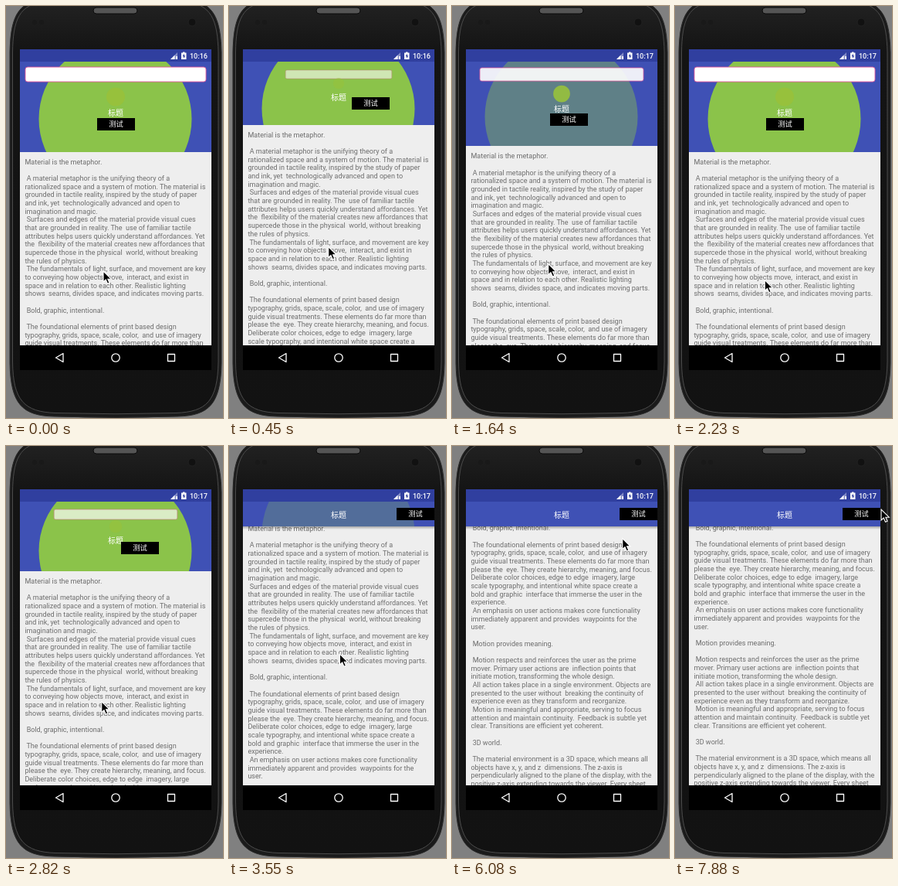
Write an HTML page that moves like this. It is 281 px wide and 533 px high and loops after 8 s.

```html
<!DOCTYPE html>
<html lang="en">
<head>
<meta charset="utf-8">
<title>Collapsing header</title>
<style>
  html, body { margin: 0; width: 100%; height: 100%; overflow: hidden; background: #808080; }
  svg { display: block; width: 281px; height: 533px; }
  text { white-space: pre; font-family: Roboto, "Noto Sans CJK SC", "Noto Sans CJK", sans-serif; }
  .copy { font-size: 9.04px; fill: #6d6d6d; }
  .label { fill: #fff; font-weight: 500; text-anchor: middle; }
</style>
</head>
<body>
<svg viewBox="0 0 281 533">
  <defs>
    <linearGradient id="face" x2="0" y2="1">
      <stop offset="0" stop-color="#222"/><stop offset=".12" stop-color="#141414"/>
      <stop offset="1" stop-color="#121212"/>
    </linearGradient>
    <linearGradient id="shade" x2="0" y2="1">
      <stop offset="0" stop-opacity=".3"/><stop offset="1" stop-opacity="0"/>
    </linearGradient>
    <clipPath id="screen"><rect x="18" y="56" width="248" height="415"/></clipPath>
    <clipPath id="headClip"><rect id="headBox" x="18" y="72" width="248"/></clipPath>
  </defs>

  <!-- Phone -->
  <path d="M5 60C6 20 12 -8 52 -8H230C271 -8 278 20 279 60V462C278 515 263 530 222 531Q142 534 62 531C21 530 6 515 5 462Z" fill="#1b1b1b" stroke="#2a2a2a"/>
  <path d="M8.500 60C9 20 16 -5 54 -5H228C267 -5 274 20 275 60V460C274 511 260 525 220 526.500Q142 529 64 526.500C24 525 9 511 8.500 460Z" fill="url(#face)" stroke="#4c4c4c"/>
  <rect x="113" y="2" width="57" height="8" rx="4" fill="#555" stroke="#0a0a0a"/>
  <circle cx="241" cy="21" r="5" fill="#111" stroke="#222"/>
  <circle cx="37" cy="21" r="3" fill="#191919"/>
  <circle cx="46" cy="21" r="3" fill="#191919"/>

  <g clip-path="url(#screen)">
    <rect x="18" y="56" width="248" height="415" fill="#eee"/>
    <g id="copy" class="copy"></g>

    <g clip-path="url(#headClip)">
      <rect x="18" y="72" width="248" height="120" fill="#3f51b5"/>
      <circle id="hero" cx="141.500" r="99" fill="#8bc34a"/>
      <rect id="scrim" x="18" y="72" width="248" height="120" fill="#3f51b5"/>
    </g>
    <rect id="shadow" x="18" y="104" width="248" height="4" fill="url(#shade)"/>
    <rect id="search" x="-117" y="-9.500" width="234" height="19" rx="3" fill="#fff" stroke="#e0569a" stroke-width=".9"/>
    <circle id="icon" r="12" fill="#97c13c"/>
    <text id="title" class="label" x="142" font-size="10">标题</text>
    <g id="button">
      <rect width="49" height="16"/>
      <text class="label" x="24.500" y="11.400" font-size="9.200">测试</text>
    </g>

    <!-- Status bar -->
    <rect x="18" y="56" width="248" height="16" fill="#303f9f"/>
    <path d="M213 69L222 60V69Z" fill="#fff" fill-opacity=".4"/>
    <path d="M213 69L218.500 63.500V69ZM220 65H222V69H220Z" fill="#fff"/>
    <path d="M227 60.500H229V59.500H231.500V60.500H233.500V69H227Z" fill="#fff"/>
    <path d="M230.800 61.500L228.500 65.200H230V68L232.200 64.300H230.800Z" fill="#303f9f"/>
    <text id="clock" class="label" x="249.500" y="67.500" font-size="9.100"></text>

    <!-- Navigation bar -->
    <rect x="18" y="439" width="248" height="32"/>
    <g fill="none" stroke="#fff" stroke-width="1.300" stroke-linejoin="round">
      <path d="M64.500 455L74 449.500V460.500Z"/>
      <circle cx="142" cy="455" r="5.200"/>
      <rect x="209.500" y="450.500" width="9" height="9"/>
    </g>
  </g>
  <path id="mouse" d="M0 0V14L3.200 11L5.500 16.300L8 15.200L5.800 10.200H10.200Z" stroke="#fff" stroke-width="1.100"/>
</svg>
<script>
const copy = `Material is the metaphor.

 A material metaphor is the unifying theory of a
rationalized space and a system of motion. The material is
grounded in tactile reality, inspired by the study of paper
and ink, yet  technologically advanced and open to
imagination and magic.
 Surfaces and edges of the material provide visual cues
that are grounded in reality. The  use of familiar tactile
attributes helps users quickly understand affordances. Yet
the  flexibility of the material creates new affordances that
supercede those in the physical  world, without breaking
the rules of physics.
 The fundamentals of light, surface, and movement are key
to conveying how objects move,  interact, and exist in
space and in relation to each other. Realistic lighting
shows  seams, divides space, and indicates moving parts.

 Bold, graphic, intentional.

 The foundational elements of print based design
typography, grids, space, scale, color,  and use of imagery
guide visual treatments. These elements do far more than
please the  eye. They create hierarchy, meaning, and focus.
Deliberate color choices, edge to edge  imagery, large
scale typography, and intentional white space create a
bold and graphic  interface that immerse the user in the
experience.
 An emphasis on user actions makes core functionality
immediately apparent and provides  waypoints for the
user.

 Motion provides meaning.

 Motion respects and reinforces the user as the prime
mover. Primary user actions are  inflection points that
initiate motion, transforming the whole design.
 All action takes place in a single environment. Objects are
presented to the user without  breaking the continuity of
experience even as they transform and reorganize.
 Motion is meaningful and appropriate, serving to focus
attention and maintain continuity.  Feedback is subtle yet
clear. Transitions are efficient yet coherent.

 3D world.

 The material environment is a 3D space, which means all
objects have x, y, and z  dimensions. The z-axis is
perpendicularly aligned to the plane of the display, with the
positive z-axis extending towards the viewer. Every sheet`;

const LOOP = 8000, TICK = 148.4, LINE = 10.67;
const $ = id => document.getElementById(id);
const clamp = (v, lo, hi) => Math.max(lo, Math.min(hi, v));
const ease = p => (1 - Math.cos(Math.PI * clamp(p, 0, 1))) / 2;
const set = (id, attrs) => {
  for (const k in attrs) $(id).setAttribute(k, attrs[k]);
};

copy.split("\n").forEach((line, i) => {
  const el = document.createElementNS("http://www.w3.org/2000/svg", "text");
  el.setAttribute("x", 24.4);
  el.setAttribute("y", i * LINE);
  el.textContent = line;
  $("copy").append(el);
});

// Eased moves in ticks: start, end, target value
const drags = [[0, 7, 111.5], [7, 11.9, 201], [15.4, 26, 97.7], [36, 41.2, -87]];
const pointer = [[0, 7, 133, 262], [7, 11.9, 124, 340], [11.9, 15.4, 116, 355], [15.4, 26, 146, 261],
  [27, 32, 239, 88], [33, 35, 146, 286], [36, 41.2, 221, 119], [41.2, 42, 239, 93],
  [47, 50, 154, 196], [51, 53, 267, 82]];

const follow = (moves, from, n) => moves.reduce(
  (pos, [a, b, ...to]) => pos.map((v, i) => v + (to[i] - v) * ease((n - a) / (b - a))), from);

function draw(now) {
  const n = Math.floor(now % LOOP / TICK + 0.08);
  const [y] = follow(drags, [201], n);
  const bottom = Math.round(clamp(y - 12.4, 104, 189));
  const open = (bottom - 104) / 85, shut = 1 - open;
  const fade = start => clamp((n - start) / 4, 0, 1);

  set("copy", { transform: `translate(0 ${y + 3.6})` });
  set("headBox", { height: bottom - 72 });
  set("hero", { cy: 146 - shut * 32 });
  set("scrim", { opacity: fade(3) - fade(9.3) + fade(21) });
  set("shadow", { opacity: open ? 0 : 1 });
  set("search", { transform: `translate(142 88.500) scale(${open})`, opacity: open });
  set("icon", { transform: `translate(142 ${117.5 - shut * 42}) scale(${open})`, opacity: open });
  set("title", { y: 142 - shut * 49 });
  set("button", { transform: `translate(${Math.round(118 + shut * 99)} ${Math.round(145 - shut * 65)})` });
  set("mouse", { transform: `translate(${follow(pointer, [126, 343], n).join(" ")})` });
  $("clock").textContent = n < 8 ? "10:16" : "10:17";
}

const start = performance.now();
(function tick() {
  draw(performance.now() - start);
  requestAnimationFrame(tick);
})();
</script>
</body>
</html>
```
